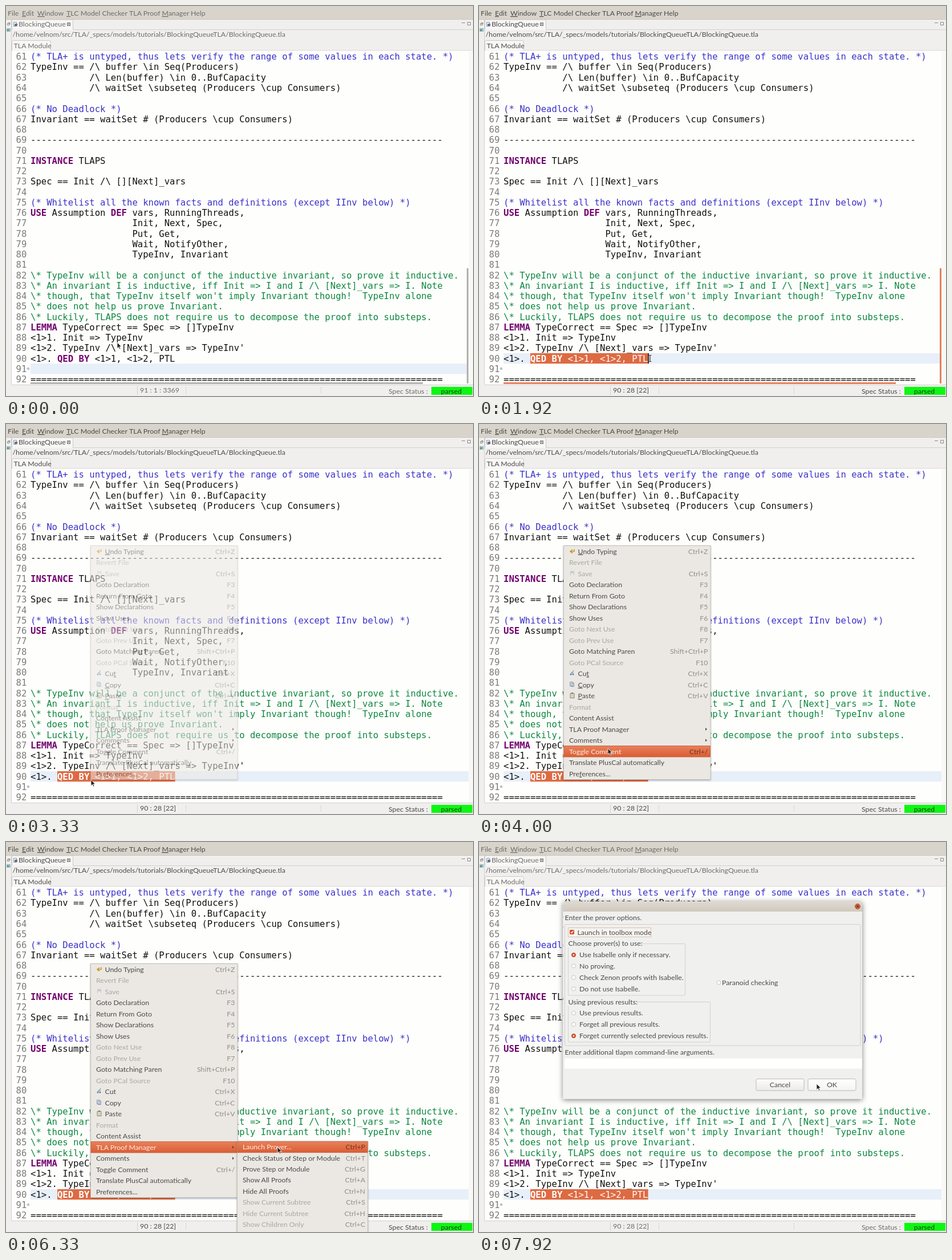
Recreate the animation shown at these times as an HTML page. Size 819x684 px, loop 8000 ms.

```html
<!DOCTYPE html>
<html lang="en">
<head>
<meta charset="utf-8">
<title>Proof editor</title>
<style>
html, body { margin: 0; width: 819px; height: 684px; overflow: hidden; background: #f0efed; }
svg { display: block; }
text { white-space: pre; font: 12.35px Lato, sans-serif; fill: #4a4a48; }
.code text { font: 15.6px "DejaVu Sans Mono", monospace; fill: #111; }
.code .num { fill: #7b7b7b; }
.code .block { fill: #3a32c8; }
.code .line { fill: #0d873f; }
.key { font-weight: bold; fill: #72006e; }
.code .picked, .picked .key { fill: #fff; }
.mn { text-decoration: underline; }
.plain .mn { text-decoration: none; }
.off { fill: #aaa7a1; }
.accel { fill: #918e88; }
.hot { fill: #fbeee8; }
.hot.accel { fill: #713420; }
.chrome text { fill: #4a4a48; }
.blurred text { fill: #6c6c69; }
</style>
</head>
<body>
<svg id="stage" width="819" height="684" viewBox="0 0 819 684"></svg>
<script>
const LOOP = 8000, COL = 9.392, CODE_X = 43, ROW = 18.26, FIRST = 61;
const stage = document.getElementById('stage');

const code = `(* TLA+ is untyped, thus lets verify the range of some values in each state. *)
TypeInv == /\\ buffer \\in Seq(Producers)
           /\\ Len(buffer) \\in 0..BufCapacity
           /\\ waitSet \\subseteq (Producers \\cup Consumers)

(* No Deadlock *)
Invariant == waitSet # (Producers \\cup Consumers)

${'-'.repeat(77)}

INSTANCE TLAPS

Spec == Init /\\ [][Next]_vars

(* Whitelist all the known facts and definitions (except IInv below) *)
USE Assumption DEF vars, RunningThreads,
                   Init, Next, Spec,
                   Put, Get,
                   Wait, NotifyOther,
                   TypeInv, Invariant

\\* TypeInv will be a conjunct of the inductive invariant, so prove it inductive.
\\* An invariant I is inductive, iff Init => I and I /\\ [Next]_vars => I. Note
\\* though, that TypeInv itself won't imply Invariant though!  TypeInv alone
\\* does not help us prove Invariant.
\\* Luckily, TLAPS does not require us to decompose the proof into substeps.
LEMMA TypeCorrect == Spec => []TypeInv
<1>1. Init => TypeInv
<1>2. TypeInv /\\ [Next]_vars => TypeInv'
<1>. QED BY <1>1, <1>2, PTL

${'='.repeat(77)}`.split('\n');

// Label, shortcut and flags: "-" disabled, ">" has a submenu; "&" marks the mnemonic.
const mainItems = `&Undo Typing|Ctrl+Z|undo
Revert File||-
Save|Ctrl+S|-save
Goto Declaration|F3
Return From Goto|F4
Show Declarations|F5
Show Uses|F6
Goto Next Use|F8|-
Goto Prev Use|F7|-
Goto Matching Paren|Shift+Ctrl+P
Goto PCal Source|F10|-
Cu&t|Ctrl+X|cut
&Copy|Ctrl+C|copy
&Paste|Ctrl+V|paste
Format||-
Content Assist
TLA Proof Manager||>
Comments||>
Toggle Comment|Ctrl+/
Translate PlusCal automatically
Pre&ferences...`.split('\n');

const subItems = `Launch Prover...|Ctrl+P
Check Status of Step or Module|Ctrl+T
Prove Step or Module|Ctrl+G
Show All Proofs|Ctrl+A
Hide All Proofs|Ctrl+N
Show Current Subtree|Ctrl+S|-
Hide Current Subtree|Ctrl+H|-
Show Children Only|Ctrl+C|-`.split('\n');

const icons = {
  undo: '<path d="M167 219.500v4h-6m3-3-4 3 4 3" fill="none" stroke="#c9962f" stroke-width="1.6"/>',
  save: '<path d="M160 258h7v7h-7z" fill="#c9cbd0"/><path d="M161.500 262h4v3h-4z" fill="#efefef"/>',
  cut: '<path d="M166 432l-4 6m4-2-5 0" stroke="#7e95ad" stroke-width="1.2"/><circle cx="161" cy="439" r="1.500" fill="#5c7ba3"/><circle cx="165" cy="439" r="1.500" fill="#5c7ba3"/>',
  copy: '<path d="M159.500 452.500h5v7h-5zM161.500 454.500h5v6h-5z" fill="#dfe6ee" stroke="#8798ad"/>',
  paste: '<path d="M160 472.500h7v8h-7z" fill="#d8d2c5" stroke="#8f8575"/><path d="M162 471h3v2h-3z" fill="#776f63"/>'
};

const esc = s => s.replace(/</g, '&lt;').replace(/>/g, '&gt;');
const label = (x, cy, s, extra = '') =>
  `<text x="${x}" y="${cy + 4.4}" ${extra}>${esc(s).replace(/&(?![lg]t;)(.)/g, '<tspan class="mn">$1</tspan>')}</text>`;
const rect = (x, y, w, h, fill, extra = '') =>
  `<rect x="${x}" y="${y}" width="${w}" height="${h}" fill="${fill}" ${extra}/>`;
const line = (d, color) => `<path d="${d}" fill="none" stroke="${color}"/>`;
const baseline = n => 94.2 + (n - FIRST) * ROW;
const colX = c => CODE_X + c * COL;
const paint = s => esc(s).replace(/\b(INSTANCE|USE|DEF|LEMMA|QED|BY)\b/g, '<tspan class="key">$1</tspan>');

function codeLine(s, i) {
  const kind = s.startsWith('(*') ? 'block' : s.startsWith('\\*') ? 'line' : '';
  const y = baseline(FIRST + i);
  return `<text class="num" x="17.500" y="${y}">${FIRST + i}</text>` +
    `<text class="${kind}" x="${CODE_X}" y="${y}">${kind ? esc(s) : paint(s)}</text>`;
}

function menu(id, items, x, top, width, height, cy, pitch) {
  const rows = items.map((item, i) => {
    const [name, key = '', flag = ''] = item.split('|');
    const y = cy + i * pitch, icon = icons[flag.replace('-', '')];
    const off = flag[0] === '-' ? 'off' : '';
    return (icon || '') +
      label(x + (icon ? 25 : 9.5), y, name, `class="${off}"`) +
      label(x + width - 4.500, y, key, `class="accel ${off}" text-anchor="end"`) +
      (flag === '>' ? `<path d="M${x + 248.500} ${y - 2.500}l3 2.500-3 2.500z" fill="#4a4a48"/>` : '');
  }).join('');
  return `<g id="${id}" data-cy="${cy}" data-pitch="${pitch}">
    ${rect(x, top, width, height, '#ebe8e3', 'stroke="#c3beb6" filter="url(#soft)"')}
    ${rect(x + .5, 0, width - 1, pitch, 'url(#orange)', 'class="bar" stroke="#c8572f" stroke-width=".8"')}
    ${rows}</g>`;
}

const radio = (y, s, on) =>
  `<circle cx="166" cy="${y}" r="3.500" fill="${on ? '#d9532c' : '#fff'}" stroke="${on ? '#b8492a' : '#c6c3be'}"/>` +
  (on ? `<circle cx="166" cy="${y}" r="1.300" fill="#fff"/>` : '') + label(176, y, s);

const button = (id, x, s) =>
  rect(x + .5, 415.5, 84, 20.5, 'url(#button)', `id="${id}" rx="2.500" stroke="#bdb9b3"`) +
  label(x + 42.5, 425.5, s, 'text-anchor="middle"');

const frame = (x, y, w, h) => rect(x, y, w, h, 'none', 'rx="1.500" stroke="#d3d0cb"');

const gradient = (id, a, b) => `<linearGradient id="${id}" x2="0" y2="1">
  <stop stop-color="${a}"/><stop offset="1" stop-color="${b}"/></linearGradient>`;

const dialog = `<g id="dialog">
  <path d="M147.500 450.500V107q0-3 3-3H669q3 0 3 3V450.500z" fill="#f0f0ee" filter="url(#deep)"/>
  <path d="M147.500 122V107q0-3 3-3H669q3 0 3 3V122z" fill="url(#title)"/>
  <circle cx="664" cy="113" r="4.500" fill="#df6845" stroke="#a9472b"/>
  <path d="M662 111l4 4m0-4-4 4" stroke="#6d2b18" stroke-width="1.200"/>
  ${label(150.5, 133, 'Enter the prover options.')}
  ${frame(150.5, 144.5, 518.5, 212.5)}
  ${rect(156.5, 150.5, 145, 16, '#f5f3f0', 'stroke="#e0bda6"')}
  ${rect(159.5, 154.5, 7, 7, '#d9532c', 'rx="1" stroke="#b8492a"')}
  <path d="M161 158l1.500 1.500 3-3.500" fill="none" stroke="#fff" stroke-width="1.200"/>
  ${label(172.5, 158.5, 'Launch in toolbox mode')}
  ${frame(156.5, 178.5, 205, 90.5)}${rect(156, 171, 131, 14, '#f0f0ee')}
  ${label(156.5, 178, 'Choose prover(s) to use:')}
  ${radio(198, 'Use Isabelle only if necessary.', true)}
  ${radio(217.5, 'No proving.')}
  ${radio(237.5, 'Check Zenon proofs with Isabelle.')}
  ${radio(257.5, 'Do not use Isabelle.')}
  ${rect(417.5, 243.5, 6, 6, '#fff', 'rx="1" stroke="#c6c3be"')}
  ${label(426, 246.5, 'Paranoid checking')}
  ${frame(156.5, 280.5, 249, 70.5)}${rect(156, 273, 121, 14, '#f0f0ee')}
  ${label(156.5, 280.5, 'Using previous results:')}
  ${radio(300, 'Use previous results.')}
  ${radio(320, 'Forget all previous results.')}
  ${radio(340, 'Forget currently selected previous results.', true)}
  ${label(150.5, 369, 'Enter additional tlapm command-line arguments.')}
  ${rect(150, 379.5, 522, 18, '#fff')}
  ${button('cancel', 485.5, 'Cancel')}${button('ok', 576.5, 'OK')}
</g>`;

const menuBar = [[3, 'File'], [28, '&Edit'], [55, '&Window'], [106, '&TLC Model Checker'],
  [216, 'TLA Proof &Manager'], [324, 'Help']].map(([x, s]) => label(x, 12.5, s)).join('');

stage.innerHTML = `<defs>
  ${gradient('orange', '#e8815b', '#da5d34')}${gradient('button', '#fdfdfc', '#eceae7')}
  ${gradient('hover', '#ffffff', '#f5f4f2')}${gradient('title', '#dfdad3', '#d1c8bd')}
  <filter id="soft"><feDropShadow dx="0" dy="1" stdDeviation="1.500" flood-opacity=".3"/></filter>
  <filter id="deep" x="-10%" y="-10%" width="120%" height="120%"><feDropShadow dx="0" dy="2" stdDeviation="5" flood-opacity=".5"/></filter>
  <clipPath id="pick"><rect id="pickArea" x="${colX(5)}" y="600" height="40"/></clipPath>
</defs>
${rect(0, 0, 819, 684, '#f0efed')}
${rect(0, 0, 819, 23.5, '#d9d4cb')}
${line('M0 23.500H819', '#c9c4bb')}
<path d="M10.500 42V26q0-2 2-2H115q2.500 0 2.500 2V42" fill="#f8f7f5" stroke="#cdcac5"/>
${line('M117.500 41.500H819M9.500 24V664.500', '#d2cfca')}
<path d="M13.500 28.500h5v7h-5z" fill="#fff" stroke="#7d8ca3"/><path d="M15 31h5v4h-5z" fill="#63748d"/>
${line('M107.500 29l5 5.500m0-5.500-5 5.500M107.500 29.500h5v5h-5z', '#777')}
${line('M799 29.500h6M809.500 28.500h5v5h-5z', '#888')}
${line('M2.500 30.500h3v3h-3zM4 29.500h3v3', '#888')}
${rect(1, 39, 7, 6, '#9db9c9')}${rect(2, 41, 3, 3, '#5f9b78')}
<path d="M10.500 78V62.500q0-2 2-2H76q2 0 2 2V78" fill="#f8f7f5" stroke="#cdcac5"/>
${line('M78 78H819', '#d8d5d0')}
${rect(10, 78.5, 809, 585.5, '#fefefd')}
${rect(811, 78.5, 8, 585.5, '#f8f8f6')}
${line('M10 664.500H819', '#d2cfca')}
<g id="chrome" class="chrome">${menuBar}
  ${label(22, 32, 'BlockingQueue')}
  ${label(11.5, 50, '/home/velnom/src/TLA/_specs/models/tutorials/BlockingQueueTLA/BlockingQueue.tla')}
  ${label(13.5, 69.5, 'TLA Module')}
  ${label(235, 674, '', 'id="status"')}
  ${label(671, 675.5, 'Spec Status :')}
</g>
${line('M230.500 667V682', '#d2cfca')}
<path d="M315.500 669V681M552.500 669V681" stroke="#aaa" stroke-dasharray="1 2"/>
${rect(746, 668, 72, 14, '#0cf712')}
${label(781, 675.5, 'parsed', 'text-anchor="middle" style="fill:#173d12"')}
<g class="code">
  ${rect(43, 0, 768, 18.3, '#e7eff9', 'id="current"')}
  ${code.map(codeLine).join('')}
  <circle cx="39" cy="636" r="1.900" fill="#e8eef5" stroke="#9bb0c6" stroke-width=".8"/>${line('M38 636h2', '#7790ab')}
  <g clip-path="url(#pick)">${rect(90, 608.9, 207, 18.3, '#de6a42')}
  <text class="picked" x="${CODE_X}" y="${baseline(90)}">${paint(code[29])}</text></g>
  ${rect(0, 608.9, 1.6, 18.3, '#111', 'id="caret"')}
</g>
<g id="bars">${rect(808, 460, 3, 202, 'inherit')}${rect(43, 660, 688, 3, 'inherit')}</g>
${menu('main', mainItems, 148.5, 213.5, 257.5, 410, 223.2, 19.5)}
${menu('sub', subItems, 405.5, 525, 229, 180, 535, 19.35)}
${dialog}
<g id="mouse"><path id="arrow" d="M0 0V10.500L2.500 8.200 4.300 12 6 11.200 4.300 7.600H7.500Z" fill="#222" stroke="#fff" stroke-width=".8"/>
<path id="beam" d="M-2.500-5.500H-.7L0-5 .7-5.500H2.500M0-5V5M-2.500 5.500H-.7L0 5 .7 5.500H2.500" fill="none" stroke="#333" stroke-width="1.200"/></g>`;

const el = id => document.getElementById(id);
const show = (node, on) => node.setAttribute('display', on ? 'inline' : 'none');
const clamp = (v, a, b) => Math.max(a, Math.min(b, v));

// Time, then coordinates; a repeated time is a jump.
const mousePath = [[40, 195, 590], [290, 185, 618], [540, 185, 618], [930, 92, 618], [1150, 92, 618],
  [1330, 119, 617], [1380, 119, 617], [1920, 300, 618], [2130, 300, 618], [2480, 225, 630], [2830, 149, 624],
  [3880, 149, 624], [4000, 226, 569], [4040, 226, 569], [4290, 252, 543], [4710, 252, 543],
  [4900, 410, 541], [5130, 573, 535], [6330, 573, 535], [6330, 476, 535], [7380, 476, 535], [7920, 592, 424]];
const pickPath = [[1130, 0], [1330, 6], [1380, 6], [1800, 22]];

function at(path, t) {
  const next = path.findIndex(p => p[0] > t);
  if (next === 0) return path[0].slice(1);
  if (next < 0) return path[path.length - 1].slice(1);
  const a = path[next - 1], b = path[next], k = (t - a[0]) / (b[0] - a[0]);
  return a.slice(1).map((v, i) => v + (b[i + 1] - v) * k);
}

function highlight(node, index) {
  const bar = node.querySelector('.bar'), cy = +node.dataset.cy, pitch = +node.dataset.pitch;
  show(bar, index >= 0);
  const y = cy + index * pitch;
  bar.setAttribute('y', y - pitch / 2);
  node.querySelectorAll('text').forEach(text =>
    text.classList.toggle('hot', Math.abs(text.getAttribute('y') - 4.4 - y) < 1));
}

function draw(t) {
  const [x, y] = at(mousePath, t);
  const picked = Math.floor(at(pickPath, t)[0] + 1e-6);
  const clicked = t >= 930, menuOpen = t >= 3290 && t < 6790;
  const subOpen = t >= 4460 && menuOpen;

  el('chrome').classList.toggle('blurred', !clicked || t >= 6790);
  el('current').setAttribute('y', baseline(clicked ? 90 : 91) - 14.8);
  el('status').textContent = !clicked ? '91 : 1 : 3369'
    : picked ? `90 : ${6 + picked} [${picked}]` : '90 : 6 : 3346';
  el('pickArea').setAttribute('width', picked * COL);
  el('caret').setAttribute('x', colX(5 + picked) - .3);
  show(el('caret'), clicked && t < 3290 && !(t >= 2360 && t < 2960));
  show(el('bars'), t < 3290);
  el('bars').setAttribute('fill', clicked ? '#e5805c' : '#b3b1ad');

  show(el('main'), menuOpen);
  el('main').setAttribute('opacity', clamp(.4 + .6 * (t - 3290) / 170, 0, 1));
  el('main').classList.toggle('plain', t >= 4800);
  highlight(el('main'), t < 3880 ? -1 : subOpen ? 16 : clamp(Math.round((y - 223.2) / 19.5), 0, 20));
  show(el('sub'), subOpen);
  highlight(el('sub'), x > 406 ? 0 : -1);
  show(el('dialog'), t >= 6880);
  el('ok').setAttribute('fill', x > 577 && y < 437 ? 'url(#hover)' : 'url(#button)');

  const beam = clicked && t < 3290;
  show(el('beam'), beam);
  show(el('arrow'), !beam);
  el('mouse').setAttribute('transform', `translate(${x} ${y})`);
}

const start = performance.now();
function tick() {
  draw((performance.now() - start) % LOOP);
  requestAnimationFrame(tick);
}
tick();
</script>
</body>
</html>
```
